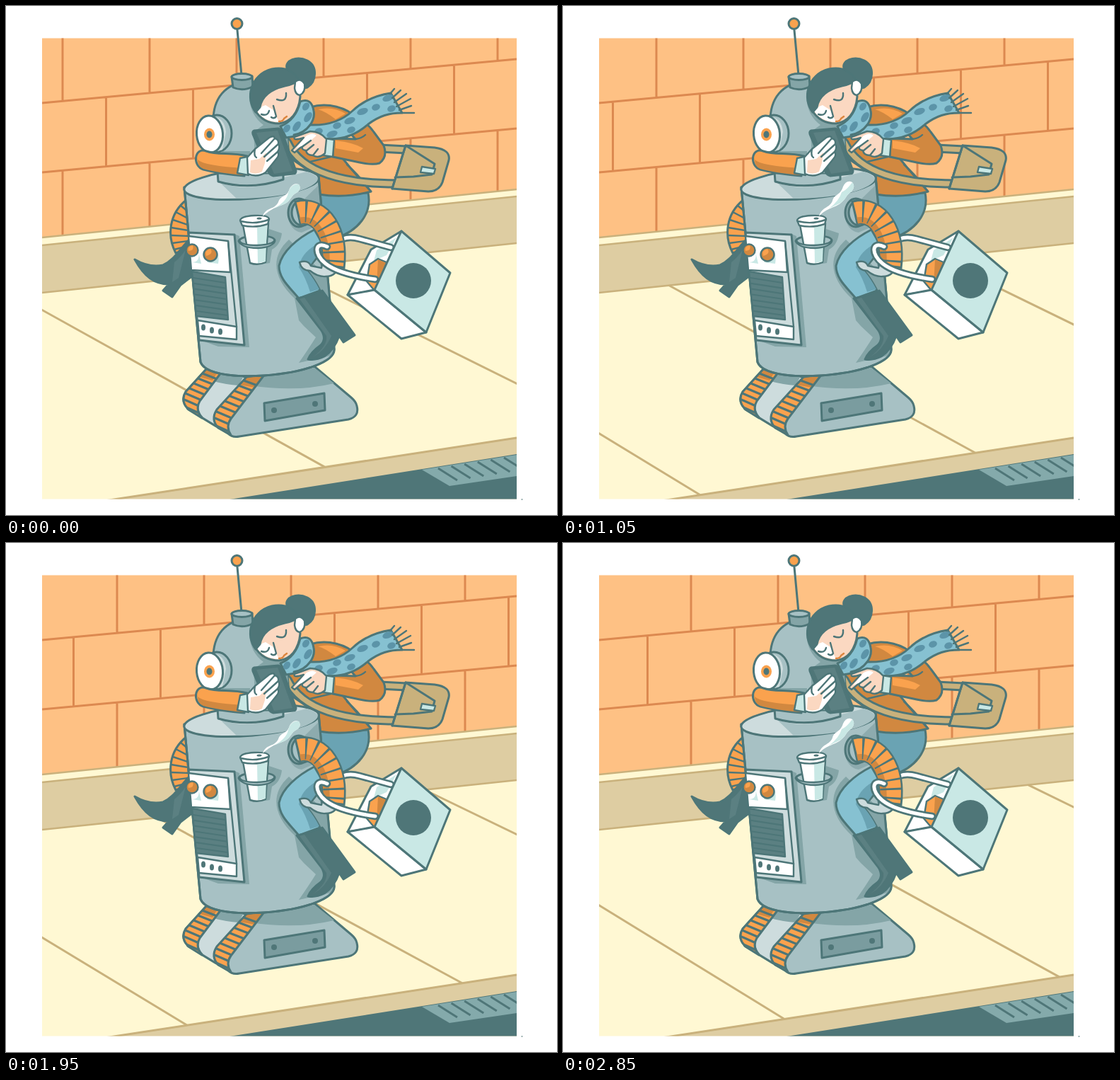
Write an HTML page that moves like this. It is 779 px wide and 719 px high and loops after 3 s.

```html
<!DOCTYPE html>
<html lang="en">
<head>
<meta charset="utf-8">
<title>Robot ride</title>
<style>
html, body { margin: 0; width: 100%; height: 100%; overflow: hidden; background: #fff; }
svg { display: block; width: 779px; height: 719px; }
.art { stroke: #4d7678; stroke-width: 3; stroke-linejoin: round; stroke-linecap: round; fill: none; }
.flat { stroke: none; }
.thin { stroke-width: 2.4; }
.steel { fill: #a7c1c4; } .pale { fill: #cddcdd; } .shade { fill: #84a5a7; }
.dark { fill: #4f7678; } .slate { fill: #5b8082; }
.orange { fill: #faa24e; } .rust { fill: #d18840; }
.blue { fill: #86c1d1; } .deep { fill: #6aa3b3; } .spot { fill: #5c94a8; }
.tan { fill: #c9b17c; } .white { fill: #fff; } .mint { fill: #c9e8e5; } .skin { fill: #fbd8c1; }
</style>
</head>
<body>
<svg viewBox="0 0 779 719" xmlns="http://www.w3.org/2000/svg">
<defs>
  <clipPath id="stage"><rect x="51" y="45.5" width="671" height="651"/></clipPath>
  <clipPath id="torso"><path d="M252 256L275 503C281 519 318 525 365 522C420 518 466 503 464 484L442 241Z"/></clipPath>
  <clipPath id="dome"><path d="M300 236L293 216V162C293 130 310 110 340 107C385 107 400 140 400 236Z"/></clipPath>
  <path id="trackA" d="M283 513L254 545Q246 558 258 570L277 582Q267 570 274 558L304 518Z"/>
  <path id="trackB" d="M340 524L298 570Q289 584 300 596L318 606Q310 594 318 583L366 520Z"/>
  <clipPath id="tracks"><use href="#trackA"/><use href="#trackB"/></clipPath>
</defs>

<g clip-path="url(#stage)">
  <path fill="#fec184" d="M51 45H722V259L51 327Z"/>
  <path id="bricks" fill="none" stroke="#dc8950" stroke-width="3"/>
  <path fill="#fff8d3" d="M51 327L722 259V620L51 712Z"/>
  <path fill="#decda2" d="M51 338L722 269V335L51 405Z"/>
  <path fill="none" stroke="#c9b17c" stroke-width="2.6" d="M51 327L722 259M51 338L722 269M51 405L722 335"/>
  <path id="slabs" fill="none" stroke="#c9b17c" stroke-width="3"/>
  <path fill="#decda2" d="M51 712.500L722 610V697H51Z"/>
  <path fill="none" stroke="#c9b17c" stroke-width="3" d="M51 712.500L722 610"/>
  <path class="dark" d="M316 697L722 633V697Z"/>
  <path fill="#84aaab" d="M588 655L722 634V664L627 678Z"/>
  <path id="grate" fill="none" stroke="#4f7678" stroke-width="3"/>
</g>
<circle cx="729.5" cy="697" r="1" fill="#7f9a9b"/>

<g class="art">
  <!-- far arm and boot -->
  <path class="orange" d="M256 273C229 294 228 326 240 349L262 342V274Z"/>
  <path class="thin" d="M247 282L258 291M240 291L257 300M236 302L257 309M233.500 313L258 317M233.500 324L259 325M235 335L257 332M238 344L257 339"/>
  <path class="dark" d="M182 358C199 368 212 368 222 366C236 360 244 346 258 331L264 381L247 394L235 411L222 402L230 393C210 393 196 383 182 358Z"/>
  <path class="flat slate" d="M238 362Q248 354 254 344L244 384L235 390Z"/>

  <!-- coat, hips and handbag -->
  <path class="deep" d="M443 264H512C518 294 497 318 466 328L444 300Z"/>
  <path class="rust" d="M430 143C455 135 482 144 496 158L470 208L488 230L516 262Q480 272 442 266V242L395 210L400 184Z"/>
  <path class="flat orange" d="M441 146Q462 141 480 152L466 160Q452 149 441 146Z"/>
  <path class="thin" d="M430 220L468 211M482 224Q500 240 516 262"/>
  <path stroke-width="13" d="M528 201L566 203M398 193C418 236 480 251 552 251"/>
  <path stroke="#c9b17c" stroke-width="7" d="M528 201L566 203M398 193C418 236 480 251 552 251"/>
  <path class="tan" d="M565 197L606 200Q629 203 626 218L617 249Q612 262 597 262L546 258Z"/>
  <path d="M565 197L606 223L602 238L576 241L550 242M565 197L546 258"/>
  <path class="mint thin" d="M588 227L607 230L605 237L586 235Z"/>

  <!-- base and tracks -->
  <path class="steel" d="M283 513L254 545Q246 558 258 570L314 604Q320 610 330 608L484 584Q500 580 496 565Q495 559 488 553L436 509Z"/>
  <path class="flat shade" d="M340 524L436 511L464 533Q410 546 346 536Z"/>
  <path class="pale" d="M302 520L273 558Q267 571 278 582L296 593L340 524Z"/>
  <path class="flat shade" d="M301 521H337L329 536Q312 535 293 530Z"/>
  <use href="#trackA" class="flat orange"/>
  <use href="#trackB" class="flat orange"/>
  <path class="flat rust" clip-path="url(#tracks)" d="M286 510H303L292 529L274 524ZM340 520H368L352 539L330 535Z"/>
  <path id="tread" clip-path="url(#tracks)" stroke-width="3.2"/>
  <use href="#trackA"/>
  <use href="#trackB"/>
  <path fill="#7a9c9f" d="M365 561L450 547L451 571L366 586Z"/>
  <circle class="flat dark" cx="379" cy="571" r="4"/><circle class="flat dark" cx="437" cy="562" r="4"/>

  <!-- torso -->
  <path class="steel" d="M252 256L275 503C281 519 318 525 365 522C420 518 466 503 464 484L442 241Z"/>
  <g clip-path="url(#torso)" class="flat">
    <path class="shade" d="M400 330C372 355 379 386 408 413L414 444L421 452L438 468Q428 484 414 504L468 492L462 390ZM323 322L330 325L344 482L300 481L275 472ZM372 315L390 321Q388 338 376 344L373 363L360 365Z"/>
    <path class="shade" d="M398 296Q402 318 418 320L445 308V250Z" opacity=".75"/>
  </g>
  <path d="M252 256L275 503C281 519 318 525 365 522C420 518 466 503 464 484L442 241"/>
  <ellipse class="pale" cx="347" cy="251" rx="95.5" ry="21" transform="rotate(-5 347 251)"/>
  <path class="flat steel" d="M302 249Q345 266 394 242L425 234Q444 240 440 247C429 262 382 272 326 272Z"/>
  <path class="steel" d="M299 234L300 248Q345 261 392 245V228Z"/>

  <!-- head -->
  <path class="steel" d="M300 236L293 216V162C293 130 310 110 340 107C385 107 400 140 400 236Z"/>
  <path class="flat shade" clip-path="url(#dome)" d="M347 112C339 135 349 158 364 168L350 178L352 214L300 214L306 205L345 205V240H400V100Z"/>
  <path d="M327 34L333 98"/>
  <path class="shade" d="M319 100L321 115Q334 121 349 114L348 99Z"/>
  <ellipse class="steel" cx="333.500" cy="100" rx="14.500" ry="4.500"/>
  <circle class="orange" cx="326.500" cy="25" r="7.500"/>
  <path id="rays" stroke="#f3a055"/>
  <ellipse class="steel" cx="298" cy="180" rx="21" ry="26"/>
  <path class="flat pale" d="M291 156Q309 157 311 178L306 203Q299 206 290 205Z"/>
  <ellipse class="white" cx="288" cy="181" rx="18.500" ry="26" transform="rotate(-5 288 181)"/>
  <ellipse class="flat orange" cx="287.500" cy="181.500" rx="7.500" ry="9"/>
  <ellipse class="flat dark" cx="287.500" cy="181.500" rx="4" ry="5"/>

  <!-- control panel -->
  <path class="pale" d="M258 320L323 323L337 479L273 472Z"/>
  <path class="white thin" d="M258 325L314 332L317 376L262 373Z"/>
  <path class="slate thin" d="M263 375L310 383L314 443L269 438Z"/>
  <path id="vent" stroke-width="2.200"/>
  <path class="white thin" d="M271 444L326 453V471L273 466Z"/>
  <path class="thin" d="M314 332L326 453"/>
  <path class="flat mint" d="M272 347Q275 362 263 362L276 364ZM292 341Q303 347 300 364L284 362Z"/>
  <g class="rust thin"><circle cx="263" cy="345" r="8.500"/><circle cx="289" cy="351" r="9.500"/></g>
  <path class="flat orange" d="M258 346Q256 339 264 338Q267 345 258 346ZM283 353Q280 345 289 343Q294 350 283 353Z"/>
  <g class="flat dark"><ellipse cx="279" cy="454" rx="3" ry="4.500"/><ellipse cx="291" cy="458" rx="3" ry="4.500"/><ellipse cx="303" cy="460" rx="3" ry="4.500"/></g>

  <!-- cup -->
  <path class="steel" d="M329 332Q332 325 354 325Q378 324 380 331Q380 339 355 340Q332 340 329 332Z"/>
  <path class="white thin" d="M335 309L345 363Q356 367 367 362L371 307Z"/>
  <path class="flat mint" d="M355 313L369 310L367 361L356 363Z"/>
  <path class="thin steel" d="M330 331Q332 338 355 338Q378 337 380 330Q379 341 356 342Q331 342 330 331Z"/>
  <path class="white thin" d="M331 303Q332 297 351 296Q371 295 372 301L370 308Q353 314 334 310Z"/>
  <path class="thin" d="M332 304Q352 309 371 302"/>
  <ellipse class="flat dark" cx="358" cy="300" rx="3.500" ry="1.500"/>
  <path id="steam" class="flat white"/>
  <path id="tip" class="flat mint"/>

  <!-- shopping bag -->
  <path class="white" d="M483 408L516 344L559 318L521 402Z"/>
  <path class="flat mint" d="M524 345L552 327L538 352L520 360Z"/>
  <path class="orange thin" d="M510 389L514 365L526 357L538 362L521 402Z"/>
  <path class="flat rust" d="M526 358L537 363L524 394Z"/>
  <path d="M476 329Q486 325 500 329L544 341" stroke-width="10.500"/>
  <path d="M476 329Q486 325 500 329L544 341" stroke="#fff" stroke-width="5"/>
  <path class="white" d="M483 408L521 401L594 461L559 470Z"/>
  <path class="mint" d="M559 318L628 377L594 461L521 401Z"/>
  <circle class="flat dark" cx="576" cy="388" r="25"/>

  <!-- near leg -->
  <path class="blue" d="M436 316C412 328 390 347 386 367C386 386 402 398 414 413L444 402Q436 386 425 373L451 342Z"/>
  <path class="flat deep" d="M437 338Q417 350 414 369Q424 384 430 404L443 400Q436 386 425 373L447 343Z"/>
  <path class="dark" d="M411 413Q430 410 447 402L493 465L477 475L471 466Q464 486 450 495Q438 501 427 499Q431 489 445 479Q454 470 445 457Z"/>
  <path class="flat slate" d="M415 414L422 412L460 466Q452 486 434 496Q455 480 453 466Z"/>

  <!-- near arm and claw -->
  <path class="pale thin" d="M415 362Q427 358 431 367L446 370L448 361L470 365Q468 382 452 382Q441 383 430 374Q418 374 415 362Z"/>
  <ellipse class="shade" cx="414" cy="292" rx="15" ry="20"/>
  <ellipse class="steel" cx="419" cy="292" rx="15" ry="18"/>
  <g stroke-linecap="butt">
    <path stroke-width="35" d="M411 292C446 284 468 320 462 369"/>
    <path stroke="#faa24e" stroke-width="29" d="M414 291.500C446 284 468 320 462.500 366"/>
    <path stroke="#d18840" stroke-width="9" d="M416 303C438 298 455 325 453 365"/>
    <path stroke-width="30" stroke-dasharray="2.600 10" stroke-dashoffset="-9" d="M414 291.500C446 284 468 320 462.500 366"/>
  </g>
  <path d="M454 340C436 331 435 351 452 364C466 375 494 382 522 386" stroke-width="10.500"/>
  <path d="M454 340C436 331 435 351 452 364C466 375 494 382 522 386" stroke="#fff" stroke-width="5"/>

  <!-- scarf and near sleeve -->
  <path class="rust" d="M492 158Q510 163 520 178L534 197Q540 213 528 222Q519 225 500 221L462 213V187L494 188L480 172Z"/>
  <path class="flat orange" d="M466 190Q492 193 505 201L498 207L466 201Z"/>
  <path class="thin" d="M494 188Q503 187 508 182"/>
  <path class="blue" d="M388 170C405 163 413 148 416 135Q432 129 435 148Q437 158 430 168C455 169 474 163 490 148C506 133 524 126 544 123L560 151C542 151 528 155 512 167C493 184 470 190 447 187Q420 181 396 186Z"/>
  <path d="M430 168Q421 180 407 182"/>
  <g id="spots" class="flat spot"></g>
  <path class="thin" d="M543 124L549 117M546 130L558 119M549 136L566 124M552 142L572 131M556 147L573 141M560 151H577"/>

  <!-- far sleeve, phone, hands -->
  <path class="orange" d="M283 205C266 199 263 226 279 231Q302 237 337 240L341 212C318 206 300 211 283 205Z"/>
  <path class="flat rust" d="M271 217Q280 226 339 229L337 239Q300 236 279 230Q271 226 271 217Z"/>
  <path class="mint thin" d="M331 215L345 212L343 239L327 236Z"/>
  <path class="dark" d="M351 176L385 173Q389 174 391 180L410 233Q410 237 406 237L378 240Q373 239 371 234L349 181Q348 177 351 176Z"/>
  <path class="flat slate" d="M354 179L384 176L405 233L379 237Z"/>
  <path class="white thin" d="M341 214L352 202L372 186Q379 182 380 187Q386 188 385 195Q388 200 384 206Q387 210 383 215L367 235Q355 243 342 237Z"/>
  <path class="flat skin" d="M346 218L358 216L368 207L366 222L362 234Q353 239 345 235Z"/>
  <path class="thin" d="M361 208L380 187M365 213L385 195M369 219L384 206M352 202Q350 212 354 214"/>
  <path class="mint thin" d="M451 187L464 189L462 213L448 211Z"/>
  <path class="skin thin" d="M404 204L421 186Q405 191 408 185L430 177Q444 177 453 188L451 208Q442 216 434 211Q425 211 424 204Q416 203 420 197L408 207Z"/>
  <path class="flat white" d="M410 201L425 183Q434 178 439 183L425 195Z"/>
  <path class="thin" d="M420 198L431 190M424 205L435 196M434 211L441 202"/>

  <!-- face -->
  <path class="dark" d="M397 88C394 77 411 70 426 77C441 85 439 107 426 115C414 118 402 106 397 88Z"/>
  <path class="skin" d="M388 112C370 117 359 130 352 147C359 159 371 166 386 166C402 164 414 151 416 128L412 102Z"/>
  <path class="flat white" d="M355 148Q360 142 367 140L378 147L386 164Q364 163 355 148Z"/>
  <path class="dark" d="M353 150C338 131 345 97 376 89Q401 84 414 104Q406 111 394 113C369 119 361 131 359 143Z"/>
  <path class="white thin" d="M409 107Q417 101 422 110Q424 122 415 126Q409 125 408 116Z"/>
  <path class="thin" d="M383 132Q397 137 396 123M361 153Q370 156 372 148M378 141L382 156Q379 160 375 157"/>
  <path class="thin" stroke="#dd853e" d="M386 163Q392 163 393 159L397 156"/>
</g>
</svg>

<script>
const $ = id => document.getElementById(id);
const set = (id, d) => $(id).setAttribute('d', d);
const line = (x1, y1, x2, y2) => `M${x1} ${y1}L${x2} ${y2}`;
const mix = (a, b, k) => a + (b - a) * k;

// n rungs between the edges a-b and c-d
function rungs(n, a, b, c, d) {
  let out = '';
  for (let i = 0; i < n; i++) {
    const k = i / (n - 1);
    out += line(mix(a[0], b[0], k), mix(a[1], b[1], k), mix(c[0], d[0], k), mix(c[1], d[1], k));
  }
  return out;
}

set('tread',
  rungs(7, [270, 516], [244, 562], [306, 530], [284, 580]) +
  rungs(9, [328, 526], [286, 588], [366, 540], [322, 604]));
set('vent', rungs(7, [265, 384], [270, 431], [310, 391], [313, 437]));
set('grate', rungs(6, [611, 653], [704, 638], [638, 670], [731, 655]));

set('rays', Array.from({ length: 8 }, (_, i) => {
  const c = Math.cos(i * Math.PI / 4), s = Math.sin(i * Math.PI / 4);
  return line(326.5 + 13 * c, 25 + 13 * s, 326.5 + 18.5 * c, 25 + 18.5 * s);
}).join(''));

const spots = [[397, 173], [411, 170], [424, 142], [427, 157], [442, 177], [461, 181],
  [468, 169], [486, 162], [488, 175], [504, 149], [523, 143], [540, 130], [545, 145]];
$('spots').innerHTML = spots.map(([x, y], i) =>
  `<ellipse cx="${x}" cy="${y}" rx="${i % 2 ? 8 : 6}" ry="4.5" transform="rotate(${i < 4 ? -55 : -20} ${x} ${y})"/>`).join('');

const STEP = 150;
const wallShift = [0, 28, 52, 77, 101];
const slabBack = [14, 86, 150, 214, 280];
const slabFront = [451, 520, 583, 645, 702];
const lit = [[300, 750], [1350, 1800], [2250, 2700]];
const steam = [
  'M363 297C368 283 379 289 385 277C389 266 397 271 401 258Q406 249 414 252Q418 258 412 263C402 268 403 275 395 279C385 284 379 283 363 297Z',
  'M362 297C366 283 377 286 381 275C384 265 392 268 396 255Q401 245 409 249Q414 255 408 262C399 268 401 272 393 278C384 286 374 284 362 297Z'
];
const tips = [
  'M399 264Q403 250 414 252Q418 258 412 263C402 268 403 275 395 279L379 286Q397 276 399 264Z',
  'M394 263Q401 260 409 249Q414 255 408 262C399 268 401 272 393 278L376 286Q390 276 394 263Z'
];

const rowY = (y, x) => y - 0.0924 * (x - 51);
const backY = x => 405 - 0.104 * (x - 51);
const frontY = x => 712.5 - 0.1527 * (x - 51);

function bricks(shift) {
  let d = line(51, 137, 722, 75) + line(51, 235, 722, 173);
  for (let x = 80 + shift; x < 790; x += 123) {
    const half = x - 61.5;
    d += line(x, 45, x, rowY(137, x)) + line(x, rowY(235, x), x, 327 - 0.101 * (x - 51));
    d += line(half, rowY(137, half), half, rowY(235, half));
  }
  return d;
}

function slabs(phase) {
  return [-1, 0, 1].map(k => {
    const b = slabBack[phase] + k * 378, f = slabFront[phase] + k * 389;
    return line(b, backY(b), f, frontY(f));
  }).join('');
}

let last = -1;
function draw(now) {
  const step = Math.floor(now % 3000 / STEP);
  if (step === last) return;
  last = step;
  const phase = step % 5, puff = step % 4 >> 1, ms = step * STEP;
  set('bricks', bricks(wallShift[phase]));
  set('slabs', slabs(phase));
  set('steam', steam[puff]);
  set('tip', tips[puff]);
  $('rays').style.display = lit.some(([a, b]) => ms >= a && ms < b) ? '' : 'none';
}

const start = performance.now();
function loop() {
  draw(performance.now() - start);
  requestAnimationFrame(loop);
}
loop();
</script>
</body>
</html>
```
